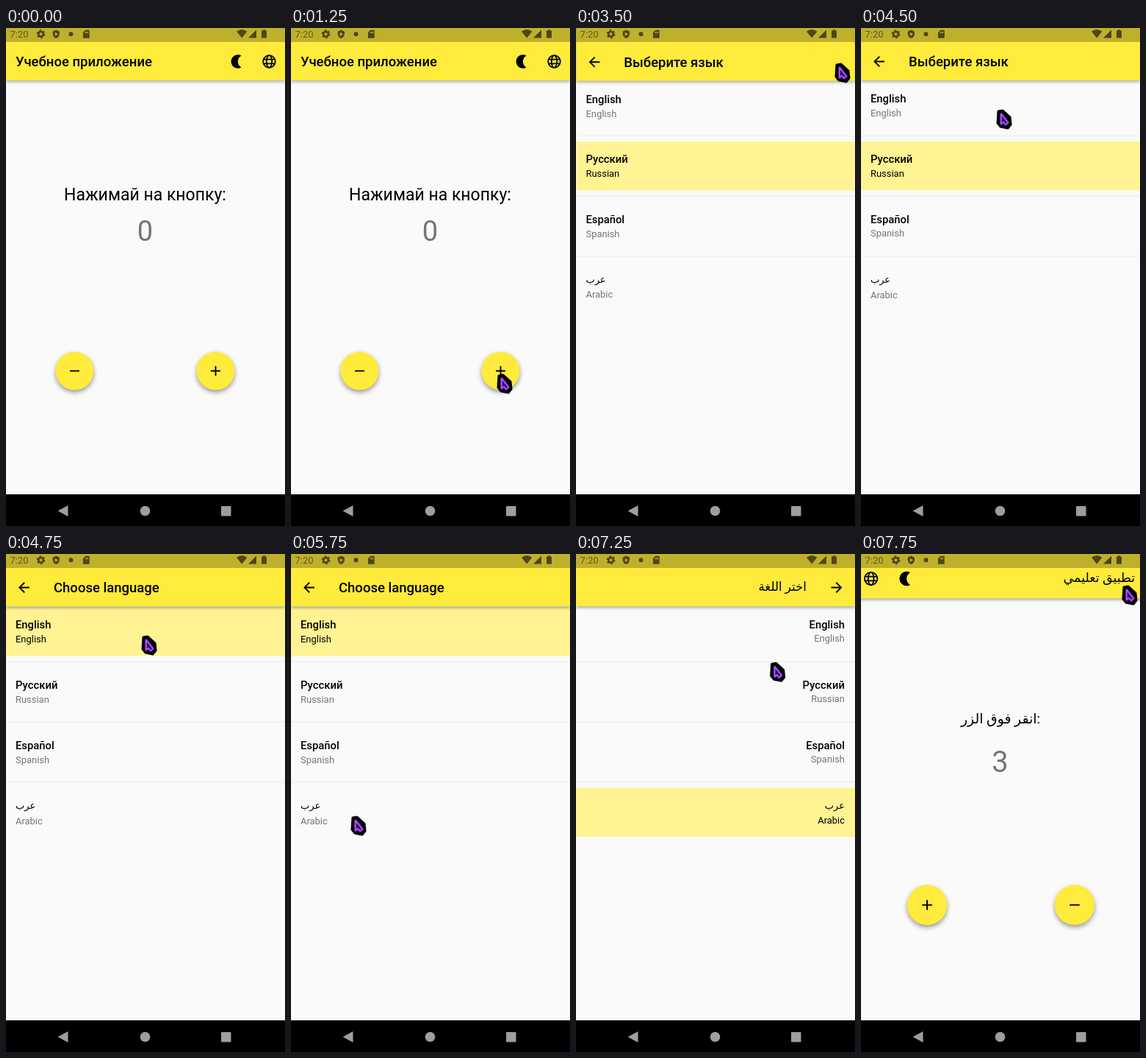
Animation, 380 px wide and 676 px high, one loop 8 s. Source, as an HTML page:

```html
<!DOCTYPE html>
<html lang="ru">
<head>
<meta charset="utf-8">
<title>Counter app</title>
<style>
  html, body { margin: 0; height: 100%; overflow: hidden; background: #fafafa; }
  svg { display: block; width: 100vw; height: 100vh; font-family: Roboto, "DejaVu Sans", sans-serif; }
  .bar { fill: #ffeb3b; filter: drop-shadow(0 2px 2px #0005); }
  .fab { fill: #ffeb3b; filter: drop-shadow(0 3px 3px #0006); }
  .title { font-size: 18.5px; font-weight: 500; }
  .heading { font-size: 23px; text-anchor: middle; }
  .count { font-size: 38px; fill: #757575; text-anchor: middle; }
  .name { font-size: 14.8px; font-weight: 500; }
  .sub { font-size: 12.95px; }
  .arTitle { font-size: 16.7px; font-weight: 500; }
  .arHeading { font-size: 18px; text-anchor: middle; }
  .arName { font-size: 13px; }
</style>
</head>
<body>
<svg id="stage" viewBox="0 0 380 676"></svg>
<script>
const LOOP = 8000, STEP = 250;
const stage = document.getElementById('stage');

// Icons on a 24 unit grid
const ICONS = {
  moon: '<path d="M14 2c1.82 0 3.53.5 5 1.35-2.99 1.73-5 4.95-5 8.65s2.01 6.92 5 8.65C17.53 21.5 15.82 22 14 22 8.48 22 4 17.52 4 12S8.48 2 14 2z"/>',
  globe: '<g fill="none" stroke="#000" stroke-width="1.9"><circle cx="12" cy="12" r="9"/><ellipse cx="12" cy="12" rx="4" ry="9"/><path d="M3.5 9h17M3.5 15h17"/></g>',
  back: '<path d="M20 11H7.83l5.59-5.59L12 4l-8 8 8 8 1.41-1.41L7.83 13H20z"/>',
  plus: '<path d="M19 13h-6v6h-2v-6H5v-2h6V5h2v6h6z"/>',
  minus: '<path d="M19 13H5v-2h14z"/>',
  shield: '<path fill-rule="evenodd" d="M12 1 3 5v6c0 5.55 3.84 10.74 9 12 5.16-1.26 9-6.45 9-12V5zM9 7l8 5-8 5z"/>',
  card: '<path fill-rule="evenodd" d="M18 2h-8L4 8v12c0 1.1.9 2 2 2h12c1.1 0 2-.9 2-2V4c0-1.1-.9-2-2-2zM9 6h2v4H9zM12 6h2v4h-2zM15 6h2v4h-2z"/>'
};

const LANGUAGES = [
  { id: 'en', name: 'English', sub: 'English', title: 'Choose language' },
  { id: 'ru', name: 'Русский', sub: 'Russian', title: 'Выберите язык' },
  { id: 'es', name: 'Español', sub: 'Spanish' },
  { id: 'ar', name: 'عرب', sub: 'Arabic', title: 'اختر اللغة' }
];

// Pointer path: time, x, y
const POINTER = [
  [500, 304, 570], [1250, 291, 483], [2250, 291, 483], [2750, 363, 61], [4000, 363, 61],
  [4500, 195, 124], [5000, 195, 124], [5250, 196, 140], [5500, 182, 222], [5750, 92, 369],
  [6750, 92, 369], [7500, 366, 56], [LOOP, 366, 56]
];

const icon = (name, x, y, scale = 0.924, flip = 1) =>
  `<g transform="translate(${x} ${y}) scale(${scale * flip} ${scale}) translate(-12 -12)">${ICONS[name]}</g>`;

const text = (cls, x, y, value, fill = '') =>
  `<text class="${cls}" x="${x}" y="${y}"${fill && ` fill="${fill}"`}>${value}</text>`;

const zoom = (scale, content) =>
  `<g transform="translate(190 300) scale(${scale}) translate(-190 -300)">${content}</g>`;

const page = (rtl, content) =>
  `<g direction="${rtl ? 'rtl' : 'ltr'}"><rect width="380" height="633" fill="#fafafa"/>${content}</g>`;

const appBar = '<rect class="bar" width="380" height="71"/>';

const fab = (x, y, name) =>
  `<circle class="fab" cx="${x}" cy="${y}" r="26"/>${icon(name, x, y)}`;

function home(rtl, count) {
  const side = x => rtl ? 380 - x : x;
  const fabY = rtl ? 468.5 : 465.5;
  const words = rtl
    ? text('arTitle', 365, 50, 'تطبيق تعليمي') + text('arHeading', 190, 233, ':انقر فوق الزر')
    : text('title', 13, 52, 'Учебное приложение') + text('heading', 189.5, 234, 'Нажимай на кнопку:');
  return page(rtl, appBar + words
    + icon('moon', rtl ? 66 : 314, 45.5) + icon('globe', side(358.5), 45.5)
    + text('count', 189.5, rtl ? 296.5 : 288.5, count)
    + fab(side(93.5), fabY, 'minus') + fab(side(285.5), fabY, 'plus'));
}

function languageList(selected, fading) {
  const rtl = selected === 'ar';
  const x = rtl ? 366 : 13;
  const rows = LANGUAGES.map((lang, i) => {
    const top = 72 + i * 81.75;
    const arabic = lang.id === 'ar';
    const active = lang.id === selected;
    let color = active ? '#000' : '#757575';
    if (fading && (active || lang.id === 'en')) color = '#333';
    const subY = top + 48 + (arabic ? 1.3 : 0) - (rtl ? 1 : 0);
    return (i ? `<rect y="${top - 8}" width="380" height="1" fill="#ebebeb"/>` : '')
      + (active ? `<rect y="${top}" width="380" height="66.5" fill="#fff394"/>` : '')
      + (active && fading ? `<svg y="${top}" width="380" height="66.5"><circle cx="61" cy="36" r="110" fill-opacity=".05"/></svg>` : '')
      + text(arabic ? 'arName' : 'name', x, top + (arabic ? 28.5 : 29.4), lang.name)
      + text('sub', x, subY, lang.sub, color);
  }).join('');
  const title = LANGUAGES.find(lang => lang.id === selected).title;
  return page(rtl, rows + appBar
    + icon('back', rtl ? 355 : 24.5, 45.5, 0.924, rtl ? -1 : 1)
    + (rtl ? text('arTitle', 314, 49.5, title) : text('title', 65, 52, title)));
}

const systemBars = `
  <rect width="380" height="19" fill="#bfb02c"/>
  <g fill="#4d4714">
    ${text('sub', 5.5, 13, '7:20', '#625a1a')}
    <circle cx="47.5" cy="8.3" r="3.3" fill="none" stroke="#4d4714" stroke-width="2.6"/>
    <circle cx="47.5" cy="8.3" r="5.1" fill="none" stroke="#4d4714" stroke-width="1.7" stroke-dasharray="2.7 2.64"/>
    ${icon('shield', 68.3, 8.3, 0.52)}
    <circle cx="88.5" cy="8.3" r="3"/>
    ${icon('card', 109.3, 8.3, 0.55)}
    <path d="M314 4.8q7.2-5.4 14.4 0L321.2 13.4zM330 13.4h11V2.4z"/>
    <path d="M348 3.4h2v-1.2h3v1.2h2v10.2h-7z"/>
  </g>
  <rect y="633" width="380" height="43"/>
  <g fill="#9e9e9e">
    <path d="M70.5 655.5 84.5 648v15z"/>
    <circle cx="189.5" cy="655.5" r="6.8"/>
    <rect x="293" y="649" width="13.5" height="13.5" rx="1"/>
  </g>`;

function pointer(t) {
  if (t < POINTER[0][0]) return '';
  const next = POINTER.findIndex(p => p[0] > t);
  const [t0, x0, y0] = POINTER[next - 1], [t1, x1, y1] = POINTER[next];
  const k = (t - t0) / (t1 - t0);
  return `<g transform="translate(${x0 + (x1 - x0) * k} ${y0 + (y1 - y0) * k})" stroke-linejoin="round">
    <path d="M-8-11-2-12 8-3 9 7 5 12-5 10-9 5z" stroke="#000" stroke-width="3"/>
    <path d="M-4-7V6L-1 3.5 2 7 5 4.5z" fill="#3a0b68" stroke="#5f1ba6" stroke-width="4"/>
    <path d="M-4-7V6L-1 3.5 2 7 5 4.5z" fill="#2a0750" stroke="#b45cff" stroke-width="1.6"/>
  </g>`;
}

function screen(t) {
  if (t >= 7750) return zoom(1.047, home(true, 3));
  if (t >= 6250) return languageList('ar', t < 6500);
  if (t >= 4750) return languageList('en');
  const count = Math.max(0, Math.min(3, Math.floor((t - 1500) / STEP)));
  const start = home(false, count);
  if (t >= 3250) return start + zoom(1 - 0.04 * Math.exp((3250 - t) / 96), languageList('ru'));
  return start + (t >= 3000 ? '<circle cx="358.5" cy="45.5" r="21" fill-opacity=".1"/>' : '');
}

let shown = -1;
function draw(now) {
  const t = Math.floor(now % LOOP / STEP) * STEP;
  if (t !== shown) {
    shown = t;
    stage.innerHTML = screen(t) + systemBars + pointer(t);
  }
  requestAnimationFrame(() => draw(performance.now()));
}
draw(performance.now());
</script>
</body>
</html>
```
